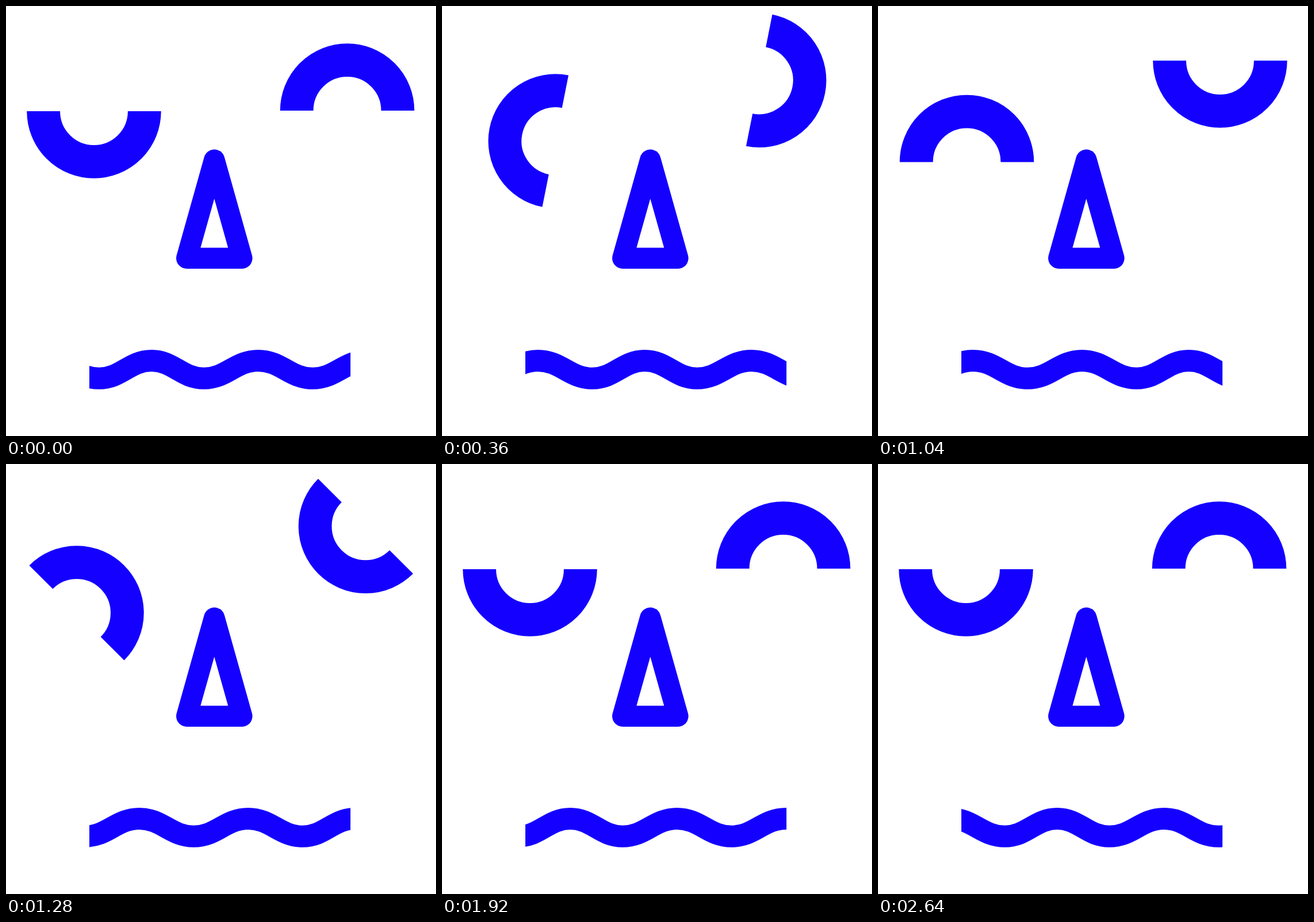
These frames come from a looping animation (748x748 px, 3.28 s). An HTML page:

```html
<!DOCTYPE html>
<html lang="en">
<head>
<meta charset="utf-8">
<title>Face</title>
<style>
  html, body { margin: 0; width: 100%; height: 100%; overflow: hidden; background: #fff; }
  svg { display: block; width: 100vw; height: 100vh; }
</style>
</head>
<body>
<svg viewBox="0 0 748 748" fill="none" stroke="#1400ff">
  <clipPath id="mouthBox"><rect x="145" y="580" width="454.2" height="110"/></clipPath>
  <g stroke-width="57.8">
    <path id="leftEye" d="M-88.6 -44.2a87.85 87.85 0 0 0 175.7 0"/>
    <path id="rightEye" d="M-88.55 43.5a87.85 87.85 0 0 1 175.7 0"/>
  </g>
  <path d="M362.35 267.8L410.4 438.7H314.3Z" stroke-width="36.5" stroke-linejoin="round"/>
  <g clip-path="url(#mouthBox)"><path id="mouth" stroke-width="38"/></g>
</svg>
<script>
  const LOOP = 3280, FRAME = 40, MOVE_END = 2240;
  const TURN = 640, TURN_PERIOD = 1120;
  const WAVE_SPEED = 0.2766, WAVE_START = 253;

  // Half waves of one mouth tile; the outer two are slightly shorter.
  const halfWaves = [91, 94.75, 94.75, 94.75, 94.75, 91];
  const tileWidth = halfWaves.reduce((a, b) => a + b);
  const tile = halfWaves.map((w, i) => {
    const dy = i % 2 ? -30.8 : 30.8;
    return `c${w * 0.42} 0 ${w * 0.58} ${dy} ${w} ${dy}`;
  }).join('');

  const [leftEye, rightEye, mouth] =
    ['leftEye', 'rightEye', 'mouth'].map(id => document.getElementById(id));
  mouth.setAttribute('d', 'M0 617' + tile.repeat(3));

  const place = (el, x, y, angle = 0) =>
    el.setAttribute('transform', `translate(${x} ${y}) rotate(${angle})`);

  function draw(now) {
    const t = Math.min(Math.floor(now % LOOP / FRAME) * FRAME, MOVE_END);
    const turns = Math.floor(t / TURN_PERIOD) + Math.min(t % TURN_PERIOD / TURN, 1);
    place(leftEye, 153.75, 227.2, turns * 180);
    place(rightEye, 594.3, 138.5, turns * 180);
    place(mouth, (WAVE_START + t * WAVE_SPEED) % tileWidth - tileWidth, 0);
  }

  const start = performance.now();
  function tick() {
    draw(performance.now() - start);
    requestAnimationFrame(tick);
  }
  tick();
</script>
</body>
</html>
```
